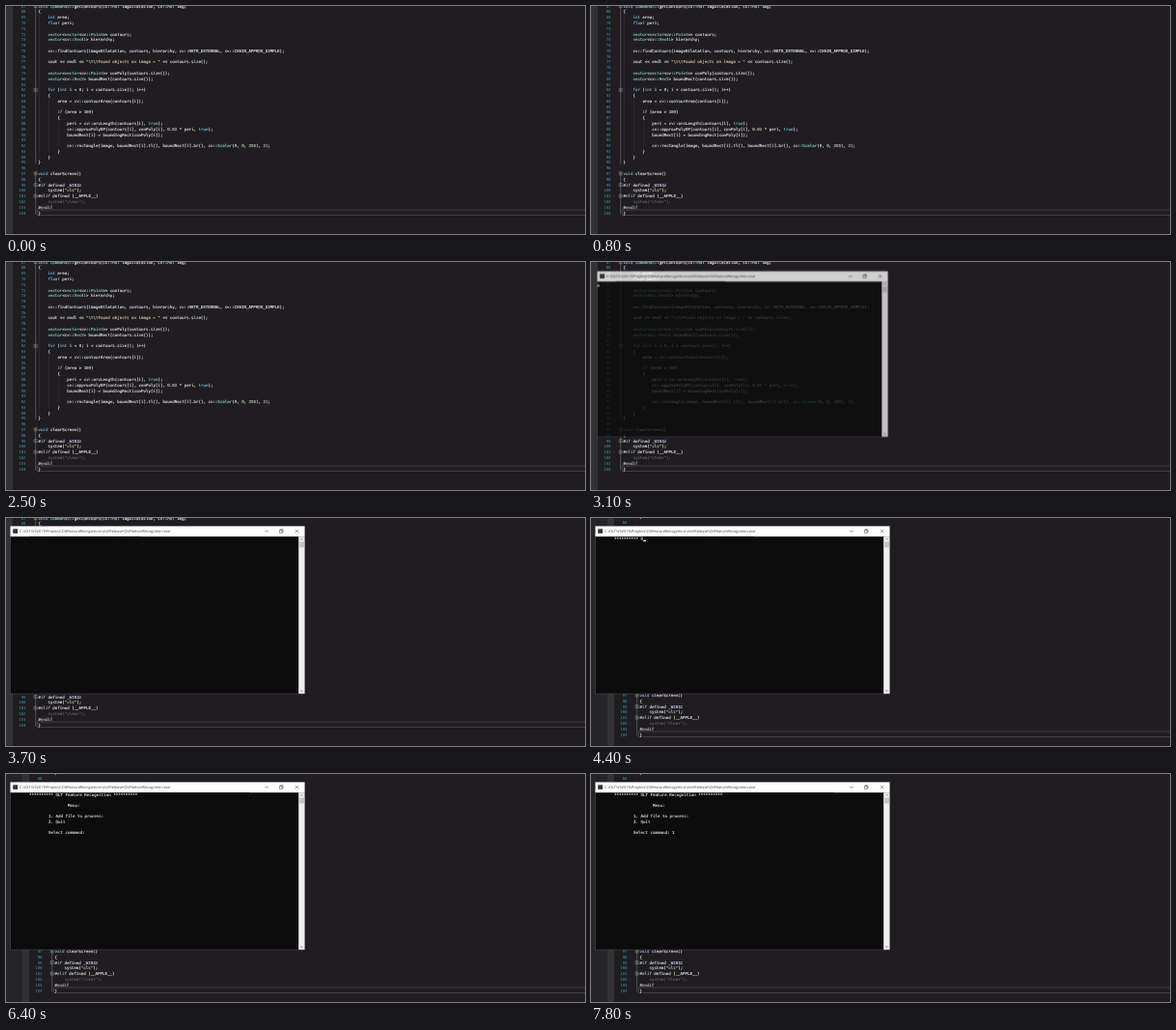
Write an HTML page that moves like this. It is 600 by 236 pixels and loops after 8 s.

```html
<!DOCTYPE html>
<html lang="en">
<head>
<meta charset="utf-8">
<title>Console start</title>
<style>
html, body { margin: 0; width: 100%; height: 100%; overflow: hidden; background: #1f1d20; }
svg { display: block; width: 600px; height: 236px; }
text { white-space: pre; text-rendering: geometricPrecision; font-family: "DejaVu Sans Mono", monospace; }
#code text { font-size: 4.12px; fill: #e4e4e4; stroke: #e4e4e4; stroke-width: .14; }
#code .num { fill: #3590ab; stroke: none; text-anchor: end; }
#code .key { fill: #7db4de; stroke: #7db4de; }
#code .type { fill: #86cfc8; stroke: #86cfc8; }
#code .str { fill: #dcc0ae; stroke: #dcc0ae; }
#code .lit { fill: #cbd6c2; stroke: #cbd6c2; }
#code .pre { fill: #b8b8b8; stroke: #b8b8b8; }
#code .macro { fill: #c4beee; stroke: #c4beee; }
#code .off, #code .off tspan { fill: #787878; stroke: none; }
.fold { fill: none; stroke: #9a9a9a; stroke-width: .5; }
.outline { stroke: #77777a; stroke-width: .6; }
.guide { stroke: #3c3c3e; stroke-width: .4; }
#out text { font-size: 4.15px; fill: #ececec; stroke: #ececec; stroke-width: .1; }
#title { font: 3.87px "Open Sans", sans-serif; fill: #444; }
.chrome { fill: none; stroke: #333; stroke-width: .5; }

#code, #win, #menu, #key, #cursor, .cover { animation: 8s infinite step-end; }
#code { animation-name: dock; }
#win { animation-name: open; transform-origin: 157px 95.5px; }
#menu { animation-name: menu; }
#key { animation-name: key; }
#cursor { animation-name: cursor; }
#cover1 { animation-name: heading; }
#cover2 { animation-name: prompt; }

@keyframes dock { 0% { transform: none } 48.75%, 100% { transform: translate(17px, 10px) } }
@keyframes open {
  0% { opacity: 0; transform: scale(.94) }
  37.25% { opacity: 0; transform: scale(.94); animation-timing-function: ease-out }
  39.75%, 100% { opacity: 1; transform: none }
}
@keyframes heading {
  0% { transform: none }
  50% { transform: none; animation-timing-function: steps(45) }
  68%, 100% { transform: translateX(112.5px) }
}
@keyframes menu { 0% { opacity: 0 } 68.25%, 100% { opacity: 1 } }
@keyframes prompt {
  0% { transform: none }
  70.625% { transform: none; animation-timing-function: steps(16) }
  77.025%, 100% { transform: translateX(40px) }
}
@keyframes key { 0% { opacity: 0 } 94.375%, 100% { opacity: 1 } }
@keyframes cursor {
  0% { transform: none; opacity: 1 }
  43.75% { transform: none; opacity: 0 }
  50% { transform: translate(20px, 0); opacity: 1; animation-timing-function: steps(45) }
  68% { transform: translate(132.5px, 0); opacity: 1 }
  68.25% { transform: translate(0, 38.5px); opacity: 1 }
  70.625% { transform: translate(40px, 38.5px); opacity: 1; animation-timing-function: steps(16) }
  77% { transform: translate(80px, 38.5px); opacity: 1 }
  77.025% { transform: translate(80px, 38.5px); opacity: 0 }
  90.625% { transform: translate(80px, 38.5px); opacity: 1 }
  94.375% { transform: translate(82.5px, 38.5px); opacity: 1 }
  96.875%, 100% { transform: translate(82.5px, 38.5px); opacity: 0 }
}
</style>
</head>
<body>
<svg viewBox="0 0 600 236">
  <rect width="600" height="236" fill="#1f1d20"/>
  <g id="code">
    <rect x="-17" y="-10" width="17" height="250" fill="#252427"/>
    <rect y="-10" width="7" height="250" fill="#323134"/>
    <rect x="32.5" y="211" width="580" height="5.6" fill="none" stroke="#505052" stroke-width=".7"/>
  </g>
  <g id="win">
    <rect x="4.5" y="8.5" width="305" height="173.5" fill="#0c0c0c" stroke="#555" stroke-width=".5"/>
    <rect x="4.5" y="8.5" width="305" height="10.7" fill="#fff"/>
    <rect x="7.2" y="11.3" width="5" height="4.6" fill="#34343c"/>
    <text id="title" x="14" y="15.2">C:\OLT\VS2019\Projects\OltFeatureRecognition\x64\Release\OltFeatureRecognition.exe</text>
    <path class="chrome" d="M268.3 13.8h3.6M283.4 12.6h2.8v2.8h-2.8zM284.2 12.6v-.8h2.8v2.8h-.8M299.8 12l3.4 3.4m0-3.4l-3.4 3.4"/>
    <rect x="303.2" y="19.2" width="6.3" height="162.6" fill="#f0f0f0"/>
    <rect x="303.5" y="24.5" width="5.7" height="6" fill="#c6c6c6"/>
    <path class="chrome" d="M305 22.6l1.4-1.4 1.4 1.4M305 178.2l1.4 1.4 1.4-1.4"/>
    <g id="out">
      <text x="24" y="23.2">********** OLT Feature Recognition **********</text>
      <rect class="cover" id="cover1" x="24" y="19.3" width="115" height="5.5" fill="#0c0c0c"/>
      <g id="menu">
        <text x="64" y="34.2">Menu:</text>
        <text x="44" y="45.2">1. Add file to process:</text>
        <text x="44" y="50.7">2. Quit</text>
      </g>
      <text x="44" y="61.7">Select command:</text>
      <rect class="cover" id="cover2" x="44" y="57.5" width="40" height="6" fill="#0c0c0c"/>
      <text id="key" x="84" y="61.7">1</text>
      <rect id="cursor" x="4.3" y="22.8" width="2.6" height="1.5" fill="#f2f2f2"/>
    </g>
  </g>
</svg>
<script>
const source = String.raw`}

void Commands::getContours(cv::Mat imgDilatation, cv::Mat img)
{
    int area;
    float peri;

    vector<vector<cv::Point>> contours;
    vector<cv::Vec4i> hierarchy;

    cv::findContours(imageDilatation, contours, hierarchy, cv::RETR_EXTERNAL, cv::CHAIN_APPROX_SIMPLE);

    cout << endl << "\t\tFound objects on image = " << contours.size();

    vector<vector<cv::Point>> conPoly(contours.size());
    vector<cv::Rect> boundRect(contours.size());

    for (int i = 0; i < contours.size(); i++)
    {
        area = cv::contourArea(contours[i]);

        if (area > 100)
        {
            peri = cv::arcLength(contours[i], true);
            cv::approxPolyDP(contours[i], conPoly[i], 0.02 * peri, true);
            boundRect[i] = boundingRect(conPoly[i]);

            cv::rectangle(image, boundRect[i].tl(), boundRect[i].br(), cv::Scalar(0, 0, 255), 2);
        }
    }
}

void clearScreen()
{
#if defined _WIN32
    system("cls");
#elif defined (__APPLE__)
    system("clear");
#endif
}`;
const first = 65, pitch = 5.78, left = 33.5, charW = 2.485;
const code = document.getElementById('code');
const baseline = n => 215.5 - (104 - n) * pitch;

function add(parent, tag, attrs, content) {
  const el = document.createElementNS('http://www.w3.org/2000/svg', tag);
  for (const k in attrs) el.setAttribute(k, attrs[k]);
  if (content) el.textContent = content;
  return parent.appendChild(el);
}

const kinds = [
  ['str', /^"/],
  ['pre', /^#/],
  ['macro', /^_WIN32$/],
  ['key', /^(void|int|float|for|if|true)$/],
  ['type', /^(vector|Point|Vec4i|Rect|Mat|Scalar|Commands)$/],
  ['lit', /^\d/],
];

function vline(name, x, from, to) {
  add(code, 'path', { class: name, d: `M${x} ${baseline(from) - 4}V${baseline(to)}` });
}
vline('outline', 30.7, 67, 95);
vline('outline', 30.7, 97, 104);
vline('guide', left + 1, 69, 94);
vline('guide', left + 1 + 4 * charW, 84, 93);
vline('guide', left + 1 + 8 * charW, 88, 92);

source.split('\n').forEach((line, i) => {
  const n = first + i, y = baseline(n);
  add(code, 'text', { class: 'num', x: 20.6, y }, String(n));
  const indent = line.search(/\S/);
  if (indent < 0) return;
  const row = add(code, 'text', { x: left + indent * charW, y, class: n === 102 ? 'off' : '' });
  for (const part of line.trim().match(/"[^"]*"|#?\w+|[^\w"#]+/g)) {
    const kind = kinds.find(([, re]) => re.test(part));
    add(row, 'tspan', kind ? { class: kind[0] } : {}, part);
  }
});

for (const n of [67, 82, 97, 99, 101]) {
  const y = baseline(n) - 1.5;
  add(code, 'path', { class: 'fold', d: `M29.2 ${y - 1.5}h3v3h-3zM29.9 ${y}h1.6` });
}
</script>
</body>
</html>
```
